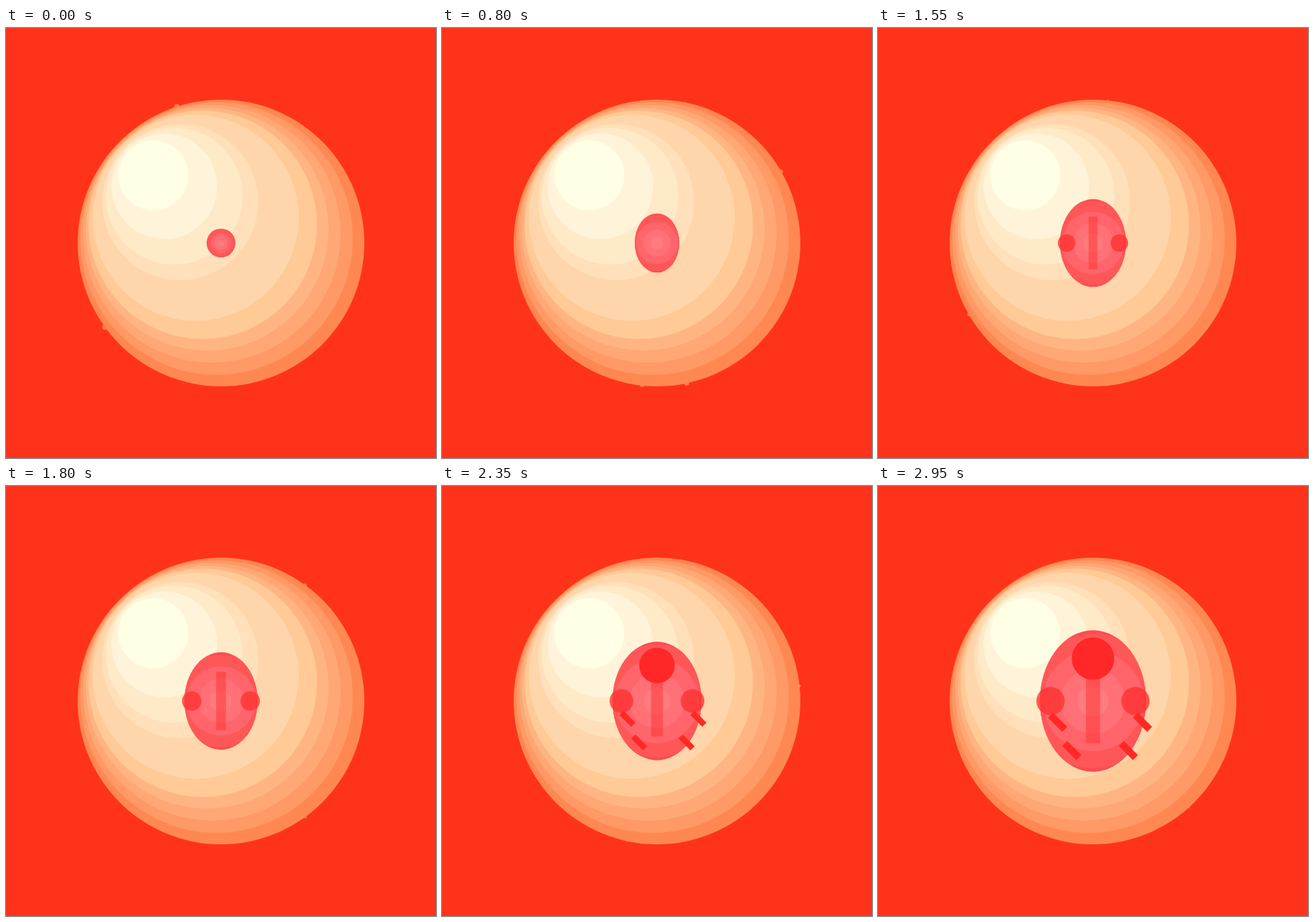
These frames come from a looping animation (600x600 px, 3000 ms). An HTML page with a canvas:

```html
<!DOCTYPE html>
<html lang="en">
<head>
<meta charset="utf-8">
<title>Growth</title>
<style>
html, body { margin: 0; width: 100%; height: 100%; overflow: hidden; background: #ff331a; }
canvas { display: block; }
</style>
</head>
<body>
<canvas id="stage" width="600" height="600"></canvas>
<script>
const ctx = document.getElementById('stage').getContext('2d');
const LOOP = 3000, STEP = 50, STEPS = LOOP / STEP;
const MID = 300, TAU = Math.PI * 2;

// [position along the gradient, colour], outermost first
const SHELL = [
  [1, '#ff8852'], [0.938, '#ff9965'], [0.873, '#ffa875'], [0.808, '#ffb583'],
  [0.746, '#ffca95'], [0.648, '#ffd6ab'], [0.43, '#ffe0ba'], [0.346, '#ffeac8'],
  [0.21, '#fff4d9'], [0.055, '#ffffe5']
];
const BODY = [
  [1, '#ff4a50'], [0.95, '#ff5758'], [0.71, '#ff656a'], [0.46, '#ff7176'], [0.22, '#ff7b7e']
];
// start points of the limbs, in body units
const LIMBS = [[-0.6, 0.2], [-0.4, 0.6], [0.6, 0.2], [0.4, 0.6]];

function oval(x, y, rx, ry, color) {
  ctx.fillStyle = color;
  ctx.beginPath();
  ctx.ellipse(x, y, rx, ry, 0, 0, TAU);
  ctx.fill();
}

function disc(x, y, r, color) {
  oval(x, y, r, r, color);
}

function drawDots(p) {
  for (let i = 0; i < 20; i++) {
    const angle = (i / 20 + p) * TAU;
    const dist = 150 + 50 * Math.sin(i + p * 5);
    disc(MID + dist * Math.cos(angle), MID + dist * Math.sin(angle), 4.1 - 2.8 * p, '#ff7f50');
  }
}

function drawShell() {
  for (const [t, color] of SHELL) {
    const c = 200 + 100 * t;
    disc(c, c, 40 + 160 * t, color);
  }
}

function drawBody(p) {
  const s = 20 + 80 * p;
  ctx.save();
  ctx.beginPath();
  ctx.ellipse(MID, MID, p > 0.2 ? s * 0.75 : s, s, 0, 0, TAU);
  ctx.fillStyle = BODY[0][1];
  ctx.fill();
  ctx.clip();
  for (const [t, color] of BODY.slice(1)) disc(MID, MID, s * t, color);
  ctx.restore();

  if (p > 0.3) {
    ctx.fillStyle = 'rgba(255, 51, 51, 0.5)';
    ctx.fillRect(MID - s * 0.1, MID - s * 0.6, s * 0.2, s * 1.2);
  }
  if (p > 0.5) {
    for (const side of [-1, 1]) disc(MID + side * s * 0.6, MID, s * 0.2, 'rgba(255, 51, 51, 0.8)');
  }
  if (p > 0.7) {
    disc(MID, MID - s * 0.6, s * 0.3, '#ff2727');
    ctx.strokeStyle = '#ff2824';
    ctx.lineWidth = s * 0.1;
    ctx.beginPath();
    for (const [x, y] of LIMBS) {
      ctx.moveTo(MID + x * s, MID + y * s);
      ctx.lineTo(MID + (x + 0.2) * s, MID + (y + 0.2) * s);
    }
    ctx.stroke();
  }
}

function draw(time) {
  const p = Math.floor((time % LOOP) / STEP) / STEPS;
  ctx.fillStyle = '#ff331a';
  ctx.fillRect(0, 0, 600, 600);
  drawDots(p);
  drawShell();
  drawBody(p);
}

let start = null;
function tick(now) {
  if (start === null) start = now;
  draw(Math.max(0, now - start));
  requestAnimationFrame(tick);
}
draw(0);
requestAnimationFrame(tick);
</script>
</body>
</html>
```
